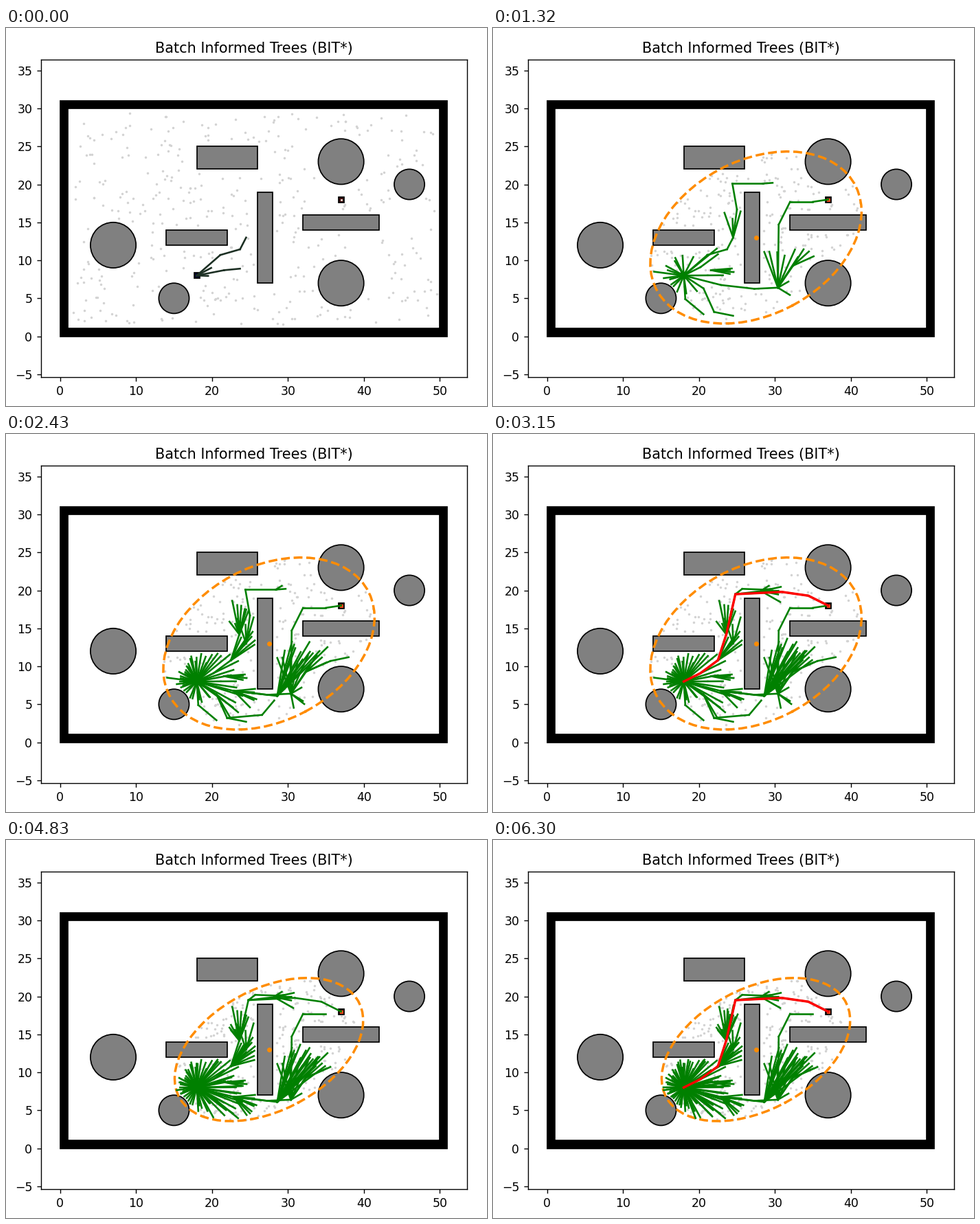
A matplotlib script for the animation above (6.39 s loop, 700 px wide and 550 px high).

```python
import math

import matplotlib.pyplot as plt
import numpy as np
from matplotlib.animation import FuncAnimation
from matplotlib.collections import LineCollection
from matplotlib.patches import Circle, Rectangle

LOOP, TICK = 6390, 30
START, GOAL = (18, 8), (37, 18)
FOCAL = math.dist(START, GOAL)
PRUNE_1, PRUNE_2 = 1140, 3300
COST_1, COST_2 = 29.57, 26.77

BLOCKS = [(14, 12, 8, 2), (18, 22, 8, 3), (26, 7, 2, 12), (32, 14, 10, 2)]
DISCS = [(7, 12, 3), (46, 20, 2), (15, 5, 2), (37, 7, 3), (37, 23, 3)]

# Spans without any redraw between steady 60 ms steps
PAUSES = [(990, 1140), (3150, 3300), (4050, 4260), (4980, 5130),
          (5190, 5340)]

# Branching points of the tree
LOW, EAST, PIVOT, FORK = (22.9, 6.75), (30.4, 6.4), (28.6, 6.1), (32.4, 9.3)
BEND, RISE, CORNER, ROOF = (22.5, 10.8), (23.6, 14.2), (24.8, 19.5), (28.2, 19.9)
SPOT, KNOT, SOUTH, DIP = (21.6, 8.7), (24.5, 13), (22, 3.2), (20.6, 6.3)
ELBOW = [(21.1, 10.7), (23.7, 11.45)]

PATH_1 = [START, LOW, (27.3, 6.25), EAST, (30.5, 14.7), (32, 17.7),
          (35, 17.7), GOAL]
PATH_2 = [START, (20.2, 9.1), BEND, RISE, CORNER, (30.9, 19.8),
          (34.4, 19.3), GOAL]

rng = np.random.default_rng(11)


def reach(p):
    """Length of the detour from start to goal through p."""
    return math.dist(p, START) + math.dist(p, GOAL)


def is_free(p, gap=0.5):
    x, y = p
    if any(bx - gap < x < bx + w + gap and by - gap < y < by + h + gap
           for bx, by, w, h in BLOCKS):
        return False
    return all(math.dist(p, (cx, cy)) > r + gap for cx, cy, r in DISCS)


def is_clear(p, q):
    steps = np.linspace(p, q, 14)
    return all(is_free(s, 0.25) for s in steps)


def scatter(count, cost=math.inf):
    points = []
    while len(points) < count:
        p = (rng.uniform(1.5, 49.7), rng.uniform(1.5, 29.5))
        if is_free(p) and reach(p) < cost:
            points.append(p)
    return points


def inside(points, cost):
    return [p for p in points if reach(p) < cost]


def cost_at(t):
    if t < PRUNE_1:
        return math.inf
    return COST_1 if t < PRUNE_2 else COST_2


edges = []


def add_edge(p, q, birth, death=LOOP):
    """Store an edge; pruning removes ends outside the current ellipse."""
    far = max(reach(p), reach(q))
    for moment, cost in ((PRUNE_1, COST_1), (PRUNE_2, COST_2)):
        if birth < moment and far > cost:
            death = min(death, moment)
    edges.append((p, q, birth, death))


def chain(points, t0, t1, death=LOOP):
    times = np.linspace(t0, t1, len(points) - 1)
    for p, q, t in zip(points, points[1:], times):
        add_edge(p, q, t, death)


def fan(hub, count, low, high, size, t0, t1, lean=0):
    """Grow spokes from hub, longer to the right by lean, clear of obstacles."""
    angles = np.radians(np.linspace(low, high, count) + rng.normal(0, 2, count))
    rng.shuffle(angles)
    for a, t in zip(angles, np.linspace(t0, t1, count)):
        r = size * (1 + lean * math.cos(a)) * rng.uniform(0.65, 1)
        while True:
            tip = (hub[0] + r * math.cos(a), hub[1] + r * math.sin(a))
            if is_clear(hub, tip) and reach(tip) < cost_at(t):
                break
            r *= 0.92
        add_edge(hub, tip, t)


def grow_first():
    fan(START, 9, 60, 310, 2.8, 90, 630)
    chain([ELBOW[1], KNOT], 60, 60, 1500)
    chain([START] + ELBOW, PRUNE_1, PRUNE_1, 1500)
    chain(PATH_1[:4], 120, 300)
    fan(SPOT, 4, -8, 5, 3.2, 90, 300)
    chain([START, (18.2, 4.9), (20.6, 2.9)], 300, 700)
    chain([START, DIP, SOUTH, (24.5, 2.7)], 400, 800)
    fan(KNOT, 3, 75, 108, 3.6, 240, 600)
    fan(EAST, 6, 58, 112, 5.8, 330, 630)
    fan(EAST, 2, -30, 28, 2.2, 500, 600)
    chain([EAST, FORK], 400, 400)
    fan(FORK, 3, 25, 60, 3.4, 480, 630)
    add_edge(START, (14.1, 8.5), 690)
    chain([KNOT, (25, 16.7), (24.4, 20.1), (28.4, 20.1)], 630, 750, 3100)
    add_edge((28.4, 20.1), (29.7, 20.2), 800)
    chain(PATH_1[3:-1], 620, 930)
    chain(PATH_1[-2:], 980, 980, PRUNE_2)


def grow_second():
    fan(START, 27, -35, 195, 4.5, 1170, 1860, lean=0.5)
    fan(START, 5, 200, 310, 2.8, 1200, 1800)
    chain(PATH_2[:4], 1200, 1320)
    fan(BEND, 6, 35, 66, 5, 1300, 1860)
    fan(RISE, 4, 75, 130, 2.2, 1500, 1740)
    fan(LOW, 3, -20, 5, 4, 1440, 1680)
    fan(DIP, 2, -55, -35, 3.8, 1500, 1740)
    fan(EAST, 2, -80, -40, 2.4, 1560, 1680)
    chain([SOUTH, (26.6, 3.6), (28.2, 5.5)], 1560, 1740)
    chain([FORK, (35.6, 10.7), (38, 11.2)], 1600, 1700)
    add_edge((28.4, 20.1), (29.2, 20.6), 1600)

    add_edge(LOW, PIVOT, 1830)
    fan(PIVOT, 11, 42, 80, 7.2, 1900, 2430, lean=0.4)
    fan(RISE, 6, 68, 100, 4.8, 1900, 2430)
    fan(LOW, 3, -40, -5, 3.6, 2000, 2300)

    fan(PIVOT, 7, 38, 70, 8, 2490, 2900, lean=0.3)
    add_edge(RISE, CORNER, 2550)
    chain([CORNER, (25.7, 20.2), (28.4, 20.1)], 2640, 2760)
    chain([CORNER, ROOF], 2700, 2700)
    fan(ROOF, 4, -28, 12, 3.4, 2760, 3000)
    chain(PATH_2[4:], 2900, 3150)


def grow_third():
    fan(START, 9, -65, 240, 4.2, 3330, 4050, lean=0.3)
    fan(LOW, 4, -55, -5, 3.6, 3400, 3900)
    fan(START, 8, -60, 30, 5, 4260, 4830, lean=0.3)
    fan(BEND, 6, 15, 60, 4, 4260, 4830)
    fan(RISE, 5, 70, 130, 2.6, 4300, 4980)
    fan(START, 3, -25, 0, 6, 5130, 5190)
    fan(START, 8, -65, 100, 4.5, 5340, 5910, lean=0.3)
    fan(RISE, 4, 70, 88, 5, 5400, 5900)
    fan(START, 6, 100, 300, 3, 6000, 6240)


first = scatter(350)
second = inside(first, COST_1) + scatter(130, COST_1)
third = inside(second, COST_2) + scatter(110, COST_2)

grow_first()
grow_second()
grow_third()

redraws = [t for t in range(30, 6301, 60)
           if not any(a < t < b for a, b in PAUSES)]
redraws = np.array(sorted({0, *redraws, *sum(PAUSES, ()), 6300}))


def ellipse(cost):
    t = np.arange(0, 2 * math.pi + 0.1, 0.1)
    u = math.sqrt(cost**2 - FOCAL**2) / 2 * np.cos(t)
    v = cost / 2 * np.sin(t)
    c, s = (GOAL[0] - START[0]) / FOCAL, (GOAL[1] - START[1]) / FOCAL
    return 27.5 + s * u + c * v, 13 - c * u + s * v


fig = plt.figure(figsize=(5.6, 4.4), dpi=125)
ax = fig.add_axes([50.5 / 700, 42 / 550, 620 / 700, 461.5 / 550])
ax.set_xlim(-2.55, 53.55)
ax.set_ylim(-5.38, 36.38)
ax.set_title("Batch Informed Trees (BIT*)")

ax.add_patch(Rectangle((0, 0), 51, 31, ec="black", fc="black"))
ax.add_patch(Rectangle((1, 1), 49, 29, ec="black", fc="white"))
for x, y, w, h in BLOCKS:
    ax.add_patch(Rectangle((x, y), w, h, ec="black", fc="gray"))
for x, y, r in DISCS:
    ax.add_patch(Circle((x, y), r, ec="black", fc="gray"))

ax.plot(*START, "s", ms=5, color="#000030", mec="black")
ax.plot(*GOAL, "s", ms=5, color="#3a0a0a", mec="black")
core, = ax.plot(*GOAL, "s", mew=0.5)
dots, = ax.plot([], [], ".", ms=2, color="lightgrey")
center, = ax.plot(27.5, 13, ".", color="darkorange")
rim, = ax.plot([], [], "--", color="darkorange", lw=2)


def edge_layer(color):
    layer = LineCollection([], colors=color, linewidths=1.5, zorder=2,
                           capstyle="projecting")
    return ax.add_collection(layer, autolim=False)


dark = edge_layer("#1c2f23")
tree = edge_layer("green")
route, = ax.plot([], [], color="red", lw=2)

trunk = [START] + ELBOW + [KNOT]
sprouts = list(zip(trunk, trunk[1:])) + [(SPOT, (23.7, 8.9))]
sprouts += [(START, tip) for tip in (SPOT, (19.9, 9), (19.5, 7.95))]


def update(i):
    t = redraws[redraws <= i * TICK].max()
    stage = int(t >= PRUNE_1) + int(t >= PRUNE_2)
    dots.set_data(*np.transpose((first, second, third)[stage]))
    dark.set_segments([] if stage else sprouts)
    tree.set_segments([(p, q) for p, q, a, b in edges if a <= t < b])

    center.set_visible(stage > 0)
    rim.set_visible(stage > 0)
    rim.set_data(*ellipse(COST_2 if stage == 2 else COST_1))
    core.set_color("#f04a18" if stage else "#f0d8d0")
    core.set_markersize(2 if stage else 1.2)

    path = []
    if 990 <= t < PRUNE_1:
        path = PATH_1
    elif 3150 <= t < PRUNE_2 or t >= 6300:
        path = PATH_2
    route.set_data([p[0] for p in path], [p[1] for p in path])
    return dots, dark, tree, center, rim, core, route


anim = FuncAnimation(fig, update, frames=LOOP // TICK, interval=TICK,
                     repeat=True, repeat_delay=0)
plt.show()
```
